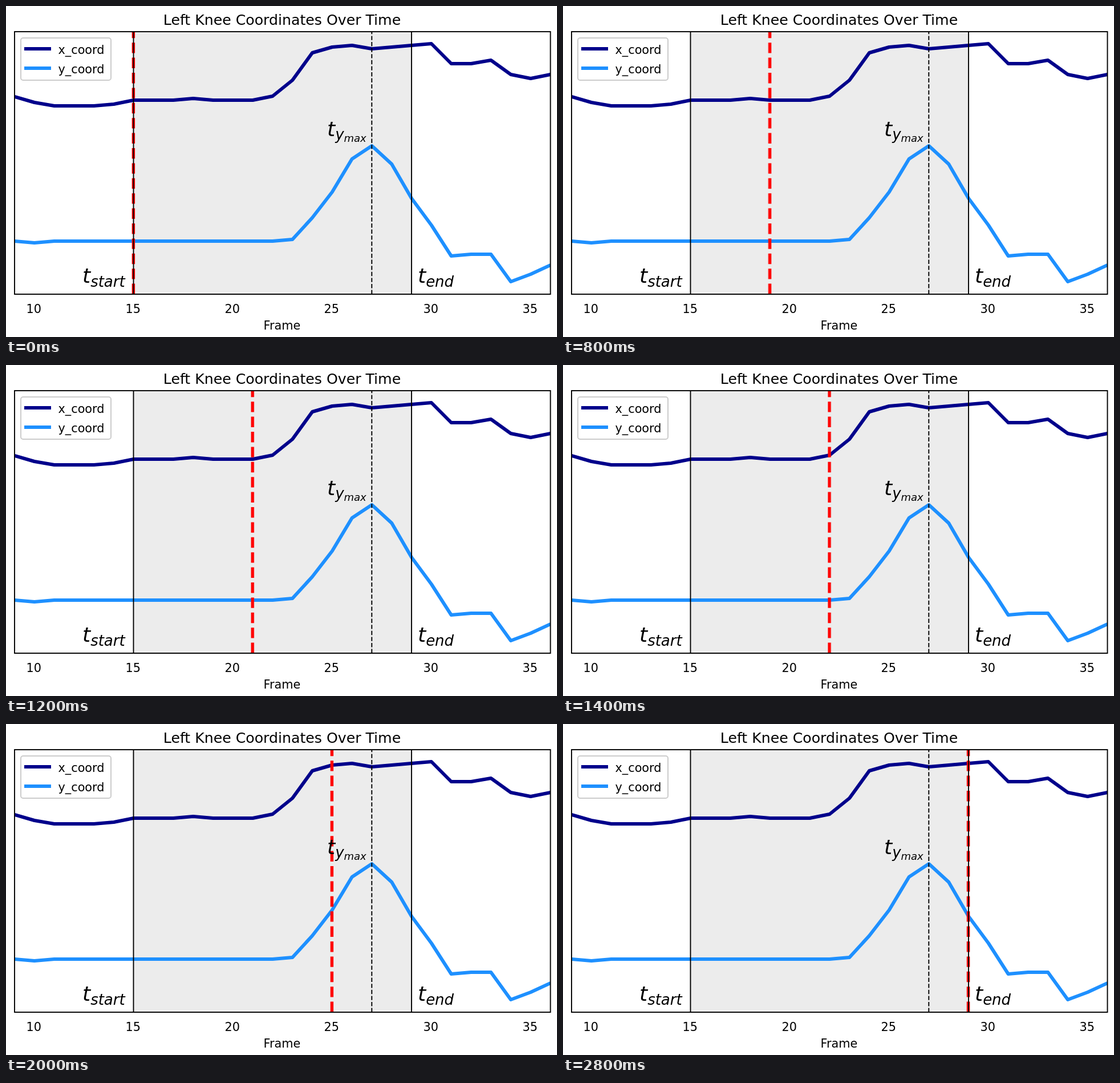
Recreate the animation shown at these times as an HTML page. Size 966 by 580 pixels, loop 3000 ms.

```html
<!DOCTYPE html>
<html lang="en">
<head>
<meta charset="utf-8">
<title>Left Knee Coordinates Over Time</title>
<style>
  html, body { margin: 0; width: 100%; height: 100%; overflow: hidden; background: #fff; }
  svg { display: block; width: 966px; height: 580px; font: 20.8px "DejaVu Sans", sans-serif; }
  .soft { filter: blur(.6px); }
  .curve { fill: none; stroke-width: 6; stroke-linejoin: round; }
  .x { stroke: #00008b; }
  .y { stroke: #1e90ff; }
  .thin { stroke: #000; stroke-width: 1.9; fill: none; }
  .mid { text-anchor: middle; }
  .math { font-style: italic; font-size: 36px; }
  .sub { font-size: 26px; }
  .subsub { font-size: 18px; }
</style>
</head>
<body>
<svg viewBox="0 0 966 580">
  <defs><clipPath id="plot"><rect x="15" y="45" width="939.5" height="460"/></clipPath></defs>
  <g class="soft">
    <rect x="223.5" y="45" width="487.5" height="460" fill="#ececec"/>
    <g clip-path="url(#plot)">
      <polyline id="xCurve" class="curve x"/>
      <polyline id="yCurve" class="curve y"/>
      <path id="cursor" d="M223.4 505V45" stroke="#f00" stroke-width="5.4" stroke-dasharray="18.4 8"/>
      <path class="thin" d="M223.5 505V45M711 505V45"/>
      <path class="thin" d="M641.3 505V45" stroke-dasharray="7.4 3.2"/>
    </g>
    <rect class="thin" x="15" y="45" width="939.5" height="460"/>

    <rect x="26" y="56" width="158" height="74" rx="4" fill="#fff" fill-opacity=".8" stroke="#ccc" stroke-width="2"/>
    <path class="curve x" d="M32 75H79"/>
    <path class="curve y" d="M32 109H79"/>
    <text x="91.5" y="84">x_coord</text>
    <text x="91.5" y="117.5">y_coord</text>

    <g class="math">
      <text x="134" y="485">t<tspan class="sub" dy="7">start</tspan></text>
      <text x="722" y="485">t<tspan class="sub" dy="7">end</tspan></text>
      <text x="563" y="228">t<tspan class="sub" dy="6">y</tspan><tspan class="subsub" dy="4">max</tspan></text>
    </g>
    <text class="mid" x="484" y="33" font-size="25.2">Left Knee Coordinates Over Time</text>
    <text class="mid" x="484" y="567">Frame</text>
    <g id="ticks" class="mid"></g>
  </g>
</svg>
<script>
  const FIRST = 9, STEP = 34.8;
  const toX = n => 15 + (n - FIRST) * STEP;

  const xCoord = [159, 169, 175, 175, 175, 172, 165, 165, 165, 162, 165, 165, 165, 158,
    130, 82, 72, 69, 75, 72, 69, 66, 101, 101, 95, 120, 127, 120];
  const yCoord = [412, 415, ...Array(12).fill(412), 409, 371, 326, 268, 245, 277, 337,
    384, 438, 435, 435, 483, 470, 454];

  const byId = id => document.getElementById(id);
  const plot = (id, values) => byId(id).setAttribute('points',
    values.map((v, i) => `${toX(FIRST + i)},${v}`).join(' '));

  plot('xCurve', xCoord);
  plot('yCurve', yCoord);

  for (let n = 10; n <= 35; n += 5) {
    const label = document.createElementNS('http://www.w3.org/2000/svg', 'text');
    label.setAttribute('x', toX(n) - 1);
    label.setAttribute('y', 537.5);
    label.textContent = n;
    byId('ticks').append(label);
  }

  // One data step every 200 ms, then a hard jump back.
  byId('cursor').animate(
    { transform: ['translateX(0)', `translateX(${15 * STEP}px)`] },
    { duration: 3000, iterations: Infinity, easing: 'steps(15, end)' });
</script>
</body>
</html>
```
